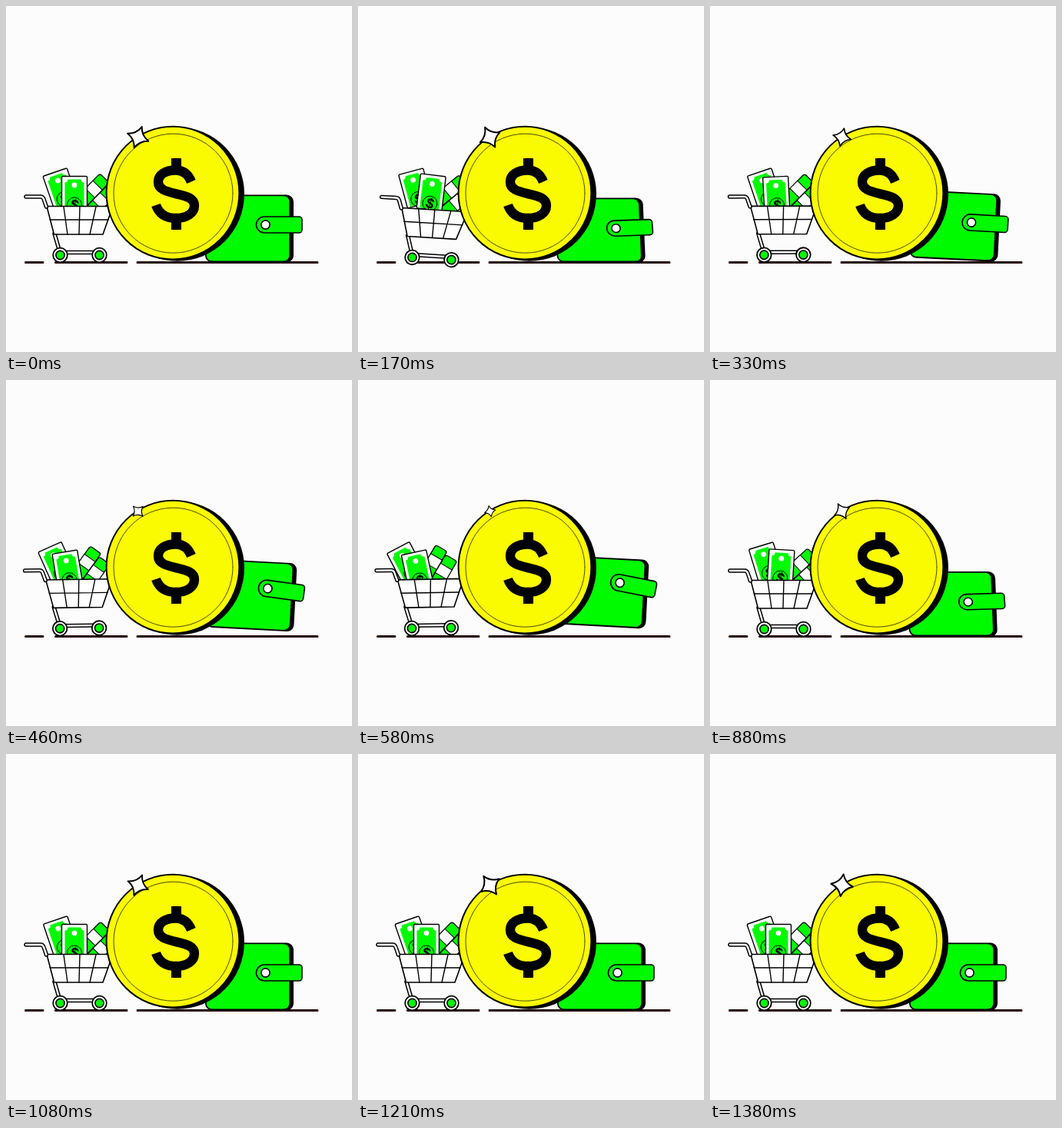
An HTML page with a canvas that plays this animation: 450x450 px, repeating every 1430 ms.

```html
<!DOCTYPE html>
<html lang="en">
<head>
<meta charset="utf-8">
<title>Coin, cart and wallet</title>
<style>
  html, body { margin: 0; height: 100%; overflow: hidden; background: #fcfcfd; }
  canvas { display: block; width: 100vw; height: 100vh; }
</style>
</head>
<body>
<canvas id="stage" width="450" height="450"></canvas>
<script>
const ctx = document.getElementById('stage').getContext('2d');
const LOOP = 1430, GREEN = '#00fa00', YELLOW = '#fafa00', INK = '#000', WHITE = '#fff';

// Eases from 0 up to 1 at the peak and back to 0.
function pulse(t, start, peak, end) {
  const u = t < peak ? (t - start) / (peak - start) : (end - t) / (end - peak);
  const v = Math.max(0, u);
  return v * v * (3 - 2 * v);
}
const crouch = t => pulse(t, 0, 170, 330);
const jump = t => pulse(t, 220, 570, 820);
const land = t => pulse(t, 700, 880, 1080);
const sway = t => crouch(t) + .5 * land(t) - 1.8 * jump(t);

const rad = deg => deg * Math.PI / 180;

function group(x, y, angle, draw) {
  ctx.save();
  ctx.translate(x, y);
  ctx.rotate(rad(angle));
  draw();
  ctx.restore();
}

function paint(path, fill, width = 0, color = INK) {
  if (fill) { ctx.fillStyle = fill; ctx.fill(path); }
  if (width) { ctx.strokeStyle = color; ctx.lineWidth = width; ctx.stroke(path); }
}

function box(x, y, w, h, r, fill, width) {
  const p = new Path2D();
  p.roundRect(x, y, w, h, r);
  paint(p, fill, width);
}

function disc(x, y, r, fill, width) {
  const p = new Path2D();
  p.arc(x, y, r, 0, 7);
  paint(p, fill, width);
}

const line = (d, width, color) => paint(new Path2D(d), null, width, color);

function tube(d) {
  line(d, 5.4);
  line(d, 2.4, WHITE);
}

function drawWallet(t) {
  const up = jump(t), squash = crouch(t) + .9 * land(t);
  // It tips forward before it leaves the ground.
  group(374, 333.5 - 10 * up * up, 3 * Math.min(1, 4 * up), () => {
    ctx.transform(1, 0, Math.tan(rad(2.4 * squash)), 1 - .045 * squash + .02 * up, 0, 0);
    box(-115, -88, 115, 88, 9, INK);
    box(-113.2, -86.2, 107.5, 84.2, 7, GREEN);
    group(-36.5, -49 + 2.5 * squash - 8 * up * up, 8 * up * up - 2 * squash, () => {
      box(-12, -10.5, 59.5, 21, [10.5, 4, 4, 10.5], GREEN, 1.6);
      disc(0, 0, 5.6, WHITE, 1.6);
    });
  });
}

function drawBundle() {
  box(0, 0, 17, 50, 3, GREEN, 1.3);
  box(0, 13, 17, 14, 0, WHITE, 1);
}

function drawBill() {
  box(0, 0, 33, 45, 1.5, WHITE, 1.4);
  paint(new Path2D('M8 4H25A4 4 0 0 0 29 8V44H4V8A4 4 0 0 0 8 4Z'), GREEN);
  disc(16.5, 11.5, 3.4, WHITE);
  disc(16.5, 37, 9.5, null, .9);
  group(16.5, 38, 12, () => {
    ctx.fillStyle = INK;
    ctx.font = 'bold 17px Inter, sans-serif';
    ctx.textAlign = 'center';
    ctx.textBaseline = 'middle';
    ctx.fillText('$', 0, 0);
  });
}

function drawNotes(t) {
  const front = sway(t), back = sway(t - 50);
  group(122 + 12 * back, 218 + 2 * back, 44 + 8 * back, () => {
    drawBundle();
    ctx.translate(17.5, 4.5);
    drawBundle();
  });
  group(48 + 6 * back, 221.5 - 2.5 * back, -19 + 5 * back, drawBill);
  group(72.5 + 9 * front, 221.5 - 3.5 * front, 6.8 * front, drawBill);
}

function drawCart(t) {
  const dip = crouch(t), up = jump(t);
  group(71 - up / 2, 324 + 3 * dip - up, 3.5 * dip - up, () => {
    ctx.translate(-71, -324);
    tube('M63 296L70 320');
    tube('M76 320.5H116');
    paint(new Path2D('M53 260.5H139L126 297H62.5Z'), WHITE, 1.6);
    line('M57 278H133M75 261L80 297M96 261L95 297M117 261L109 297', 1.4);
    tube('M26 248H45Q48 248 49 251L52.5 261');
    for (const x of [70.5, 121.5]) {
      disc(x, 324, 9.3, WHITE, 1.8);
      disc(x, 324, 5.6, GREEN, 1.6);
    }
  });
}

function drawCoin() {
  disc(222.8, 244.6, 87.2, INK);
  disc(217, 243.2, 86.4, YELLOW, 2);
  disc(217.5, 243.7, 77.5, null, .7);
  ctx.lineCap = 'butt';
  line('M241 228.5C237 219 230 213.5 221 213.5C207 213.5 198 219.5 198 229C198 238 207 241 221 244.2' +
    'C236 247.5 245 250.5 245 259.5C245 269.5 235 276 221 276C208 276 199 270 195 259', 12.3);
  line('M221.5 198V212M221.5 277V291', 13);
  ctx.lineCap = 'round';
}

function drawStar(t) {
  const size = 1 - .5 * pulse(t, 150, 600, 1150);
  group(171.7, 170.7, 20 + 360 * t / LOOP, () => {
    ctx.scale(size, size);
    paint(new Path2D('M0-14.5Q3.5-3.5 14.5 0Q3.5 3.5 0 14.5Q-3.5 3.5-14.5 0Q-3.5-3.5 0-14.5Z'), WHITE, 2);
  });
}

function frame(now) {
  const t = now % LOOP;
  ctx.fillStyle = '#fcfcfd';
  ctx.fillRect(0, 0, 450, 450);
  ctx.lineCap = ctx.lineJoin = 'round';
  line('M25.5 333.5H48M64.5 333.5H157M171 333.5H405', 3, '#240404');
  drawWallet(t);
  drawNotes(t);
  drawCart(t);
  drawCoin();
  drawStar(t);
  requestAnimationFrame(frame);
}
frame(performance.now());
</script>
</body>
</html>
```
